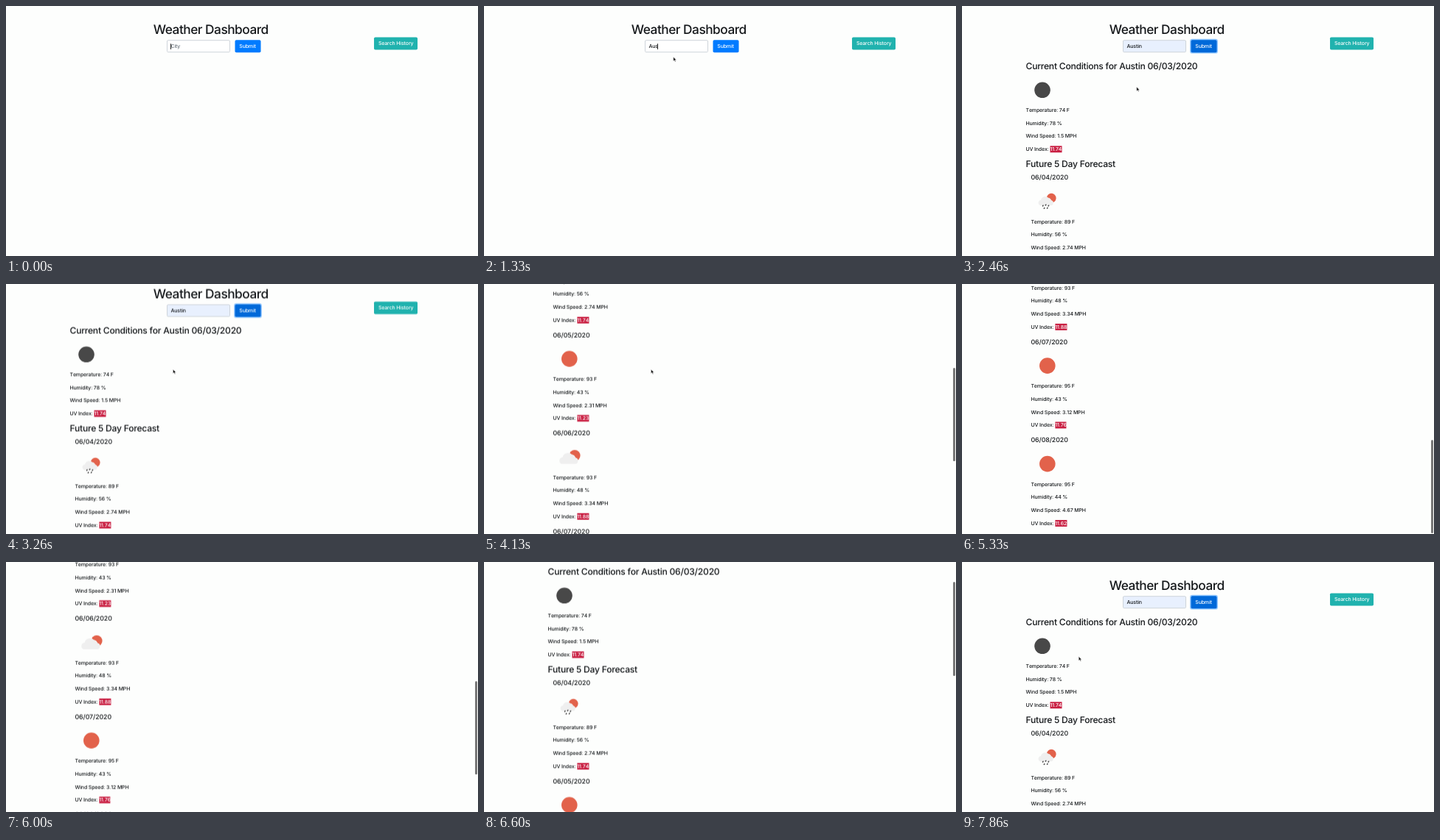
An HTML page for the animation above (8000 ms loop, 640 by 340 pixels).

```html
<!DOCTYPE html>
<html lang="en">
<head>
<meta charset="utf-8">
<title>Weather Dashboard</title>
<style>
html, body { margin: 0; width: 100%; height: 100%; overflow: hidden; background: #fdfefd; }
body { position: relative; font: 450 6.95px Inter, "Open Sans", sans-serif; color: #15181b; letter-spacing: -.018em; font-kerning: none; text-rendering: geometricPrecision; }
#page, .text, .box, svg { position: absolute; left: 0; top: 0; }
#page { will-change: transform; }
.text { white-space: pre; line-height: 1.21; }
.box { box-sizing: border-box; border-radius: 1.8px; }
.uv { background: #c91f42; color: #fff; }
svg { overflow: visible; }
#caret { width: .6px; height: 7.5px; top: 51px; background: #222; }
#bar { left: 635.6px; width: 3.4px; height: 127.5px; border-radius: 2px; background: #777; }
</style>
</head>
<body>
<div id="page"></div>
<div id="bar" class="box"></div>
<svg id="pointer" width="1" height="1"><path d="M0 0V5.7L1.4 4.5 2.3 6.6 3.3 6.2 2.4 4.2H4.1Z" fill="#111" stroke="#fff" stroke-width=".5"/></svg>
<script>
const $ = id => document.getElementById(id);
const SUN = '#e2624b', CLOUD = '#efefef', DARK = '#484848', PAPER = '#fdfefd';

// y is the middle of the capitals
const text = (x, y, str, style = '', id = '') =>
  `<div class="text" id="${id}" style="transform:translate(${x}px,${y}px) translateY(-50%);${style}">${str}</div>`;
const heading = (x, y, size, str, track) =>
  text(x, y, str, `font-size:${size}px;font-weight:500;font-kerning:normal;letter-spacing:${track}em`);
const box = (x, y, w, h, style, id = '') =>
  `<div class="box" id="${id}" style="transform:translate(${x}px,${y}px);width:${w}px;height:${h}px;${style}"></div>`;
const circle = (x, y, r, fill) => `<circle cx="${x}" cy="${y}" r="${r}" fill="${fill}"/>`;
const icon = (x, y, shapes) =>
  `<svg width="1" height="1" style="transform:translate(${x}px,${y}px)">${shapes}</svg>`;

const cloudPath = 'M-10.2 9.5A4.6 4.6 0 0 1-9.3.5 7.2 7.2 0 0 1 3.2-3 5.5 5.5 0 0 1 8 1.2 4.2 4.2 0 0 1 8 9.5Z';
const cloud = `<path d="${cloudPath}" fill="${CLOUD}" stroke="${PAPER}" stroke-width="1" paint-order="stroke"/>`;
const drops = [[-5.8, 5.6], [-2, 4.6], [1.8, 5.6], [-4, 9], [.2, 8.8]]
  .map(([x, y]) => `<path d="M${x} ${y}l-.5 .8" stroke="${DARK}" stroke-width="1.5" stroke-linecap="round"/>`).join('');
const icons = {
  night: circle(0, 0, 10.8, DARK),
  sun: circle(0, 0, 10.8, SUN),
  partly: circle(7.2, -2, 7.6, SUN) + cloud,
  rain: circle(5.4, -4.4, 6.4, SUN) + `<g transform="translate(-1.4 -2) scale(.8)">${cloud}</g>` + drops
};

const report = (x, y, temp, humidity, wind, uv) => [
  `Temperature: ${temp} F`, `Humidity: ${humidity} %`, `Wind Speed: ${wind} MPH`,
  `UV Index: <span class="uv">${uv}</span>`
].map((line, i) => text(x, y + i * 17.75, line)).join('');

const days = [
  ['rain', 89, 56, 2.74, 11.74],
  ['sun', 93, 43, 2.31, 11.23],
  ['partly', 93, 48, 3.34, 11.88],
  ['sun', 95, 43, 3.12, 11.76],
  ['sun', 95, 44, 4.67, 11.62]
];
const forecast = days.map(([sky, ...values], i) => {
  const y = 133.5 * i;
  return heading(93.4, y + 234.7, 8.75, `06/0${i + 4}/2020`, -.006) +
    icon(115.8, y + 265.6, icons[sky]) + report(93.4, y + 293.9, ...values);
}).join('');

$('page').innerHTML =
  heading(199.8, 33.1, 17.3, 'Weather Dashboard', -.029) +
  box(218, 46.2, 86, 17, 'border:.5px solid #ced4da', 'field') +
  text(223.5, 55.1, '', '', 'city') +
  '<div class="box" id="caret"></div>' +
  box(310.5, 46.2, 34.5, 17, '', 'submit') + text(316.3, 55.1, 'Submit', 'color:#fff') +
  box(499, 42.5, 59, 17, 'background:#20b2ae') + text(505, 51.4, 'Search History', 'color:#fff') +
  '<div id="results">' +
  heading(86.5, 81.9, 12.1, 'Current Conditions for Austin 06/03/2020', -.0195) +
  icon(109, 114.3, icons.night) + report(86.5, 142.2, 74, 78, 1.5, 11.74) +
  heading(86.5, 215.5, 12.1, 'Future 5 Day Forecast', -.0195) + forecast + '</div>';

const scrollKeys = [[3200, 0], [3260, 18.2], [4130, 297], [4800, 510], [4950, 542], [5130, 555],
  [5740, 555], [5900, 490], [6400, 160], [6600, 69], [6750, 20], [6860, 5], [7000, 0]];
const pointerKeys = [[1200, 262, 68], [1500, 250, 71], [1950, 327, 56], [2150, 327, 56], [2460, 236.7, 110],
  [2660, 236.7, 110], [3060, 226.4, 116], [7460, 226.4, 116], [7860, 158.2, 128.5]];

function along(keys, t) {
  const next = keys.findIndex(k => k[0] > t);
  if (next < 0) return keys[keys.length - 1].slice(1);
  if (next === 0) return keys[0].slice(1);
  const a = keys[next - 1], b = keys[next], p = (t - a[0]) / (b[0] - a[0]);
  return a.slice(1).map((v, i) => v + (b[i + 1] - v) * p);
}
const ramp = (t, from, to) => Math.min(1, Math.max(0, (t - from) / (to - from)));

function draw(t) {
  const [scroll] = along(scrollKeys, t), [px, py] = along(pointerKeys, t);
  const filled = t >= 1530, pressed = t >= 2060;
  const typed = filled ? 'Austin' : t >= 1000 ? 'Aus' : t >= 730 ? 'Au' : t >= 460 ? 'A' : '';

  $('page').style.transform = `translateY(${-scroll}px)`;
  $('city').textContent = typed || 'City';
  $('city').style.color = typed ? '#15181b' : '#6c757d';
  $('field').style.background = filled ? '#e8f0fe' : '#fff';
  $('caret').style.left = 223.2 + (typed ? $('city').offsetWidth : 0) + 'px';
  $('caret').style.opacity = pressed ? 0 : 1;
  $('submit').style.background = pressed ? '#0069d9' : '#007bff';
  $('submit').style.boxShadow = pressed ? '0 0 0 1.4px rgba(38,143,255,.5)' : 'none';
  $('results').style.visibility = t >= 2200 ? 'visible' : 'hidden';
  $('bar').style.top = 1 + scroll * .38 + 'px';
  $('bar').style.opacity = ramp(t, 3270, 3330) * (1 - ramp(t, 7460, 7720));
  $('pointer').style.transform = `translate(${px}px,${py}px)`;
  $('pointer').style.opacity = t < 1200 || (t >= 4900 && t < 7460) ? 0 : 1;
}

const start = performance.now();
(function tick() {
  draw((performance.now() - start) % 8000);
  requestAnimationFrame(tick);
})();
</script>
</body>
</html>
```
